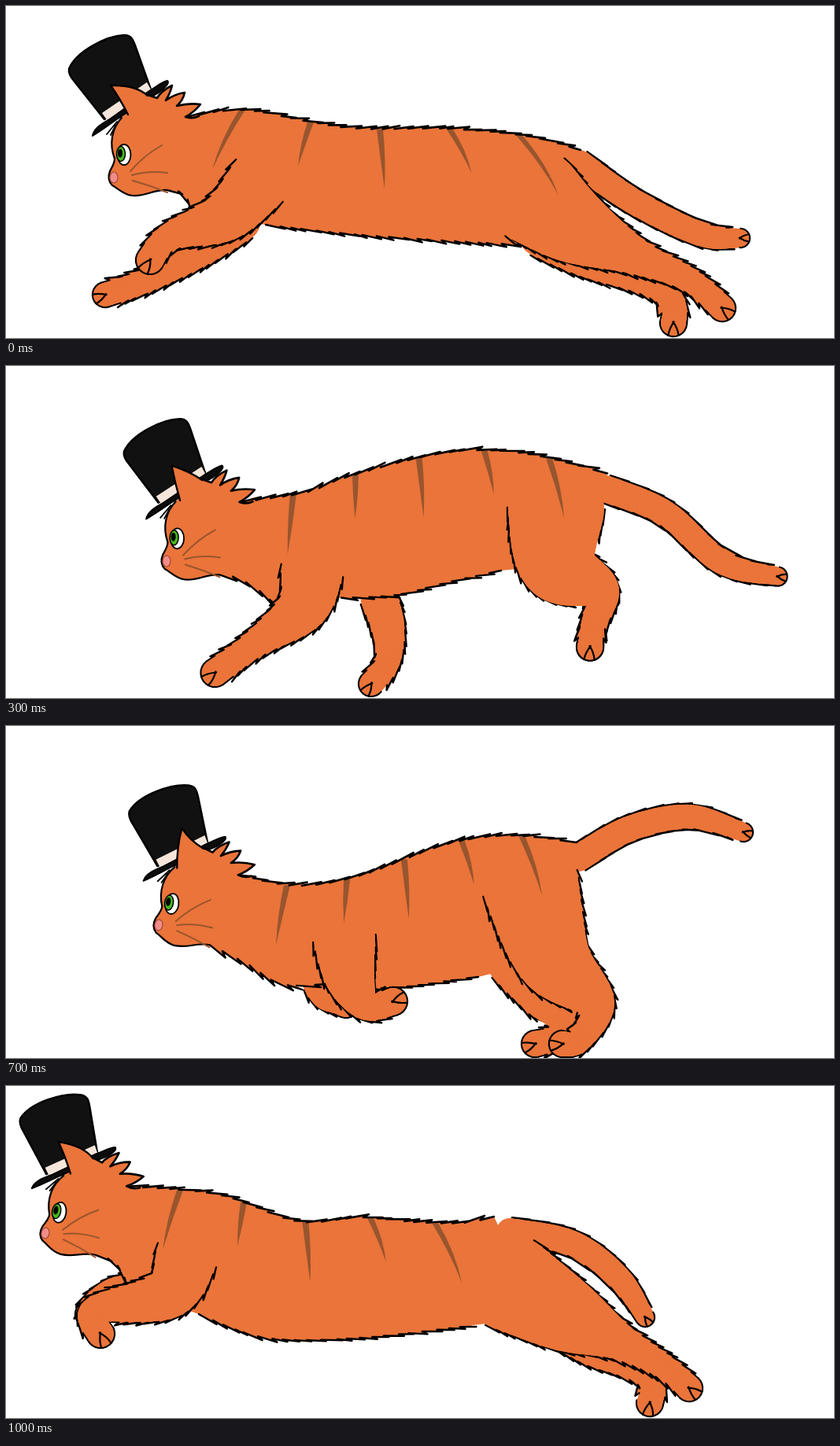
Recreate the animation shown at these times as an HTML page with a canvas. Size 1052 by 422 pixels, loop 1.1 s.

```html
<!DOCTYPE html>
<html lang="en">
<head>
<meta charset="utf-8">
<title>Running cat</title>
<style>
html, body { margin: 0; width: 100%; height: 100%; overflow: hidden; background: #fff; }
canvas { display: block; width: 100%; height: 100%; }
</style>
</head>
<body>
<canvas id="stage" width="1052" height="422"></canvas>
<script>
const ctx = document.getElementById('stage').getContext('2d');
const ORANGE = '#ea7439', BROWN = '#98552e', INK = '#000';

// Half widths of each limb from root to tip, one per joint
const WIDTH = {
  tail: [18, 17, 16, 12],
  fore: [40, 32, 18, 18], foreFar: [24, 22, 16, 16],
  hind: [62, 48, 24, 16, 17], hindFar: [30, 26, 20, 16, 17]
};

// A pose is a rig: head (nose x, y, turn, ear raised), stripe fan,
// body lines and the joints of the limbs. Hidden far legs follow the near ones.
const poses = [
  {
    head: [137, 218, 0, 0], fan: 22,
    back: [300,132, 385,147, 450,156, 560,156, 660,165, 730,183],
    belly: [330,278, 430,289, 540,297, 662,304],
    chest: [220,236, 232,248, 236,264],
    tail: [728,200, 800,250, 885,291, 933,295],
    fore: [322,222, 278,268, 208,293, 183,323], foreFar: [300,275, 250,308, 180,348, 126,367],
    hind: [672,243, 722,280, 800,318, 868,348, 910,384], hindFar: [680,290, 740,320, 820,350, 848,378, 848,403]
  },
  {
    head: [199, 249, -4, 0], fan: 9,
    back: [385,152, 405,141, 490,135, 580,120, 650,112, 778,127],
    belly: [382,290, 470,290, 560,276, 660,260],
    chest: [285,260, 295,273, 297,298],
    tail: [778,148, 838,188, 915,254, 977,265],
    fore: [358,258, 325,305, 235,346, 181,377], foreFar: [435,290, 440,330, 425,375, 390,405],
    hind: [712,180, 735,255, 820,268, 843,315, 866,349]
  },
  {
    head: [209, 247, 6.4, 1], fan: 4,
    back: [375,170, 450,145, 550,100, 605,94, 690,114, 750,146],
    belly: [470,299, 520,292, 560,274, 598,260],
    chest: [300,278, 342,293, 395,316],
    tail: [745,164, 838,186, 905,246, 984,270],
    fore: [420,262, 428,310, 395,362, 350,403], foreFar: [512,300, 530,330, 546,375, 538,403],
    hind: [686,182, 666,250, 692,302, 648,345, 618,366]
  },
  {
    head: [299, 255, 7.7, 1], fan: -4,
    back: [464,205, 530,152, 590,121, 645,109, 700,117, 765,151],
    belly: [535,322, 560,312, 585,308, 608,302],
    chest: [410,306, 460,331, 535,322],
    tail: [765,172, 860,154, 940,177, 995,216],
    fore: [522,240, 545,290, 558,335, 585,363], foreFar: [548,310, 548,330, 551,348, 557,360],
    hind: [715,190, 680,262, 668,335, 655,385, 574,404], hindFar: [640,260, 635,300, 636,345, 630,385, 575,400]
  },
  {
    head: [194, 253, 8, 1], fan: 10,
    back: [370,203, 450,190, 550,153, 610,141, 660,140, 725,148],
    belly: [462,334, 510,331, 560,324, 600,319],
    chest: [306,302, 350,328, 410,328],
    tail: [727,168, 793,130, 870,115, 937,135],
    fore: [430,270, 437,320, 458,357, 492,350], foreFar: [400,325, 408,340, 420,350, 432,355],
    hind: [666,200, 695,295, 750,352, 728,400, 707,404], hindFar: [640,300, 680,345, 708,372, 700,395, 672,404]
  },
  {
    head: [40, 213, 10, 1], fan: 14,
    back: [240,170, 350,184, 450,158, 490,158, 535,166, 565,158],
    belly: [190,288, 280,317, 390,320, 540,310],
    chest: [115,246, 130,256, 138,265],
    tail: [580,170, 650,134, 720,112, 782,101],
    fore: [207,228, 200,264, 152,282, 168,311],
    hind: [560,230, 632,298, 712,332, 734,372, 730,404], hindFar: [600,300, 640,325, 685,348, 690,378, 678,403]
  },
  {
    head: [50, 187, 10.2, 0], fan: 14,
    back: [270,138, 370,172, 450,167, 520,173, 580,174, 620,166],
    belly: [245,290, 330,320, 450,320, 610,302],
    chest: [135,222, 148,238, 155,258],
    tail: [640,185, 720,200, 780,245, 812,294],
    fore: [230,215, 205,265, 112,285, 120,315], foreFar: [175,262, 140,264, 112,277, 104,290],
    hind: [640,250, 710,290, 780,325, 838,358, 868,384], hindFar: [700,300, 745,330, 800,355, 822,378, 818,403]
  }
].map(p => ({ foreFar: p.fore, hindFar: p.hind, ...p }));

// Pose shown in each 100 ms step; halves are in-betweens
const steps = [0, .5, 1, 1.5, 2, 2.5, 3, 4, 4.5, 5, 6];

const rnd = i => { const v = Math.sin(i * 12.9898 + 4.1) * 43758.5453; return v - Math.floor(v); };
const lerp = (a, b, t) => a + (b - a) * t;
const mix = (a, b, t) => Array.isArray(a) ? a.map((v, i) => lerp(v, b[i], t)) : lerp(a, b, t);
const pairs = flat => Array.from({ length: flat.length / 2 }, (_, i) => flat.slice(2 * i, 2 * i + 2));

function poseAt(k) {
  const a = poses[Math.floor(k)], b = poses[Math.ceil(k)];
  return Object.fromEntries(Object.keys(a).map(n => [n, mix(a[n], b[n], k % 1)]));
}

// Catmull-Rom through points of any dimension
function spline(p) {
  const out = [], get = i => p[Math.max(0, Math.min(p.length - 1, i))];
  for (let i = 0; i < p.length - 1; i++)
    for (let t = 0; t < 1; t += 1 / 16) {
      const [a, b, c, d] = [-1, 0, 1, 2].map(o => get(i + o));
      out.push(b.map((v, j) => v + .5 * t * (c[j] - a[j] + t * (2 * a[j] - 5 * v + 4 * c[j] - d[j] + t * (3 * (v - c[j]) + d[j] - a[j])))));
    }
  return [...out, p[p.length - 1]];
}

// Position and normal at a distance along a polyline
function walker(pts) {
  const d = [0];
  for (let i = 1; i < pts.length; i++)
    d.push(d[i - 1] + Math.hypot(pts[i][0] - pts[i - 1][0], pts[i][1] - pts[i - 1][1]));
  const at = s => {
    let i = 1;
    while (i < d.length - 1 && d[i] < s) i++;
    const [x0, y0] = pts[i - 1], [x1, y1] = pts[i], l = d[i] - d[i - 1] || 1;
    const t = (s - d[i - 1]) / l;
    return [lerp(x0, x1, t), lerp(y0, y1, t), (y1 - y0) / l, (x0 - x1) / l];
  };
  return { len: d[d.length - 1], at };
}

// Saw-toothed tufts along a curve; a third value lifts the pen
function fur(pts, side, h, size) {
  const w = walker(pts), n = Math.max(2, Math.round(w.len / size)), s = w.len / n;
  const out = [pts[0].slice(0, 2)];
  for (let i = 1; i <= n; i++) {
    const r = rnd(i + n * 7), base = i < n ? (i + (r - .5) * .5) * s : w.len;
    if (i < n) {
      const [x, y, nx, ny] = w.at(base + s * .4), o = side * h * (.4 + .8 * rnd(i * 3 + n));
      out.push([x + nx * o, y + ny * o]);
    }
    out.push([...w.at(base).slice(0, 2), r < .2]);
  }
  return out;
}

function trace(pts, pen) {
  ctx.beginPath();
  pts.forEach((p, i) => i && !(pen && p[2]) ? ctx.lineTo(p[0], p[1]) : ctx.moveTo(p[0], p[1]));
}
function fill(pts, color = ORANGE) { trace(pts); ctx.fillStyle = color; ctx.fill(); }
function ink(pts, width = 2.4) {
  trace(pts, true);
  ctx.strokeStyle = INK; ctx.lineWidth = width; ctx.stroke();
}

// Limb around a spine: furry edges, rounded tip, two toe lines
function limb(joints, widths, h = 3.5, size = 13) {
  const spine = spline(pairs(joints).map((p, i) => [...p, widths[i]]));
  const last = spine.length - 1;
  const edge = s => spine.map(([x, y, w], i) => {
    const [x0, y0] = spine[Math.max(0, i - 1)], [x1, y1] = spine[Math.min(last, i + 1)];
    const l = Math.hypot(x1 - x0, y1 - y0) || 1;
    return [x + s * w * (y1 - y0) / l, y - s * w * (x1 - x0) / l];
  });
  const front = edge(-1), rear = edge(1);
  const fa = fur(front, -1, h, size), fb = fur(rear, 1, h, size);
  const [x, y, r] = spine[last];
  const dir = Math.atan2(rear[last][1] - y, rear[last][0] - x) + Math.PI / 2;
  const polar = (a, d) => [x + d * Math.cos(dir + a), y + d * Math.sin(dir + a)];
  const tip = Array.from({ length: 13 }, (_, i) => polar(Math.PI * (.5 - i / 12), r));

  return {
    front, rear,
    draw() {
      fill([...fa, ...tip.slice().reverse(), ...fb.slice().reverse()]);
      ink(fa); ink(fb); ink(tip);
      ctx.fillStyle = ORANGE;
      for (const [cx, cy, w] of spine) {
        ctx.beginPath(); ctx.arc(cx, cy, w - 1, 0, 7); ctx.fill();
      }
      for (const a of [-.45, .35]) {
        ctx.beginPath();
        ctx.moveTo(...polar(a, r));
        ctx.quadraticCurveTo(...polar(a * 1.7, r * .5), ...polar(a, -r * .1));
        ctx.lineWidth = 2.2; ctx.stroke();
      }
    }
  };
}

// Five tapered stripes hang from the back and fan out
function stripes(back, fan) {
  const w = walker(back);
  ctx.fillStyle = BROWN;
  for (let i = 0; i < 5; i++) {
    const [x, y] = w.at(w.len * (.14 + .175 * i));
    const tx = x + 6 + fan * (i - 2), ty = y + 76 - 20 * (i % 2);
    const cx = lerp(x, tx, .65), cy = (y + ty) / 2;
    ctx.beginPath();
    ctx.moveTo(x - 4, y);
    ctx.quadraticCurveTo(cx - 3, cy, tx, ty);
    ctx.quadraticCurveTo(cx + 4, cy, x + 4, y);
    ctx.fill();
  }
}

function ellipse(x, y, rx, ry, color, width, line = INK) {
  ctx.beginPath();
  ctx.ellipse(x, y, rx, ry, 0, 0, 7);
  ctx.fillStyle = color; ctx.fill();
  if (width) { ctx.strokeStyle = line; ctx.lineWidth = width; ctx.stroke(); }
}

// Head shapes, measured from the nose
const crown = new Path2D('M-57-138C-48-160-10-180 13-181C22-181 24-176 27-168L47-112L-12-74L-50-122Q-58-131-57-138Z');
const brim = new Path2D('M-27-53C-25-64-12-70-4-75L45-110C55-116 62-122 68-123C72-120 62-110 50-104L10-78C0-72-12-62-27-53Z');
const faceLine = 'M10-76C-3-62-6-42 1-24C1-18-3-12-5-8C-8 0-6 6-2 10C6 14 12 22 24 23C42 24 50 15 68 16';
const maneLine = '108-78Q100-74 91-77Q102-83 110-93Q95-95 80-91Q88-98 90-108Q77-106 66-98Q72-108 74-117Q60-110 55-101L43-105';
const face = new Path2D(faceLine);
const skull = new Path2D(faceLine + 'L100 0L120-55L' + maneLine + 'Z');
const mane = new Path2D('M' + maneLine);
const whiskers = new Path2D('M21-8Q38-28 61-41M23-3Q44-9 68-6M24 4Q46 10 68 19');
const tuft = new Path2D('M4-71L-9-55M2-66L-4-54');

const onHead = ([x, y, turn], px, py) => {
  const a = turn * Math.PI / 180, c = Math.cos(a), s = Math.sin(a);
  return [x + px * c - py * s, y + px * s + py * c];
};

function stroke(path, width, color = INK) {
  ctx.strokeStyle = color; ctx.lineWidth = width; ctx.stroke(path);
}

function drawHead([x, y, turn, up]) {
  ctx.save();
  ctx.translate(x, y);
  ctx.rotate(turn * Math.PI / 180);

  ctx.fillStyle = '#111';
  ctx.fill(crown); stroke(crown, 2.5);
  fill([[-15, -82], [42, -121], [47, -112], [-8, -72]], '#f5e6dc');
  ctx.fillStyle = '#0c0c0c';
  ctx.fill(brim); stroke(brim, 2);

  ctx.fillStyle = ORANGE;
  ctx.fill(skull);
  stroke(face, 2.2); stroke(mane, 2.6); stroke(tuft, 1.8);

  ctx.beginPath();
  ctx.moveTo(lerp(18, 13, up), lerp(-80, -75, up));
  ctx.quadraticCurveTo(lerp(8, 9, up), -100, lerp(-4, 12, up), lerp(-117, -126, up));
  ctx.quadraticCurveTo(lerp(28, 24, up), lerp(-118, -112, up), 43, -104);
  ctx.fillStyle = ORANGE; ctx.fill();
  ctx.strokeStyle = INK; ctx.lineWidth = 2.4; ctx.stroke();

  stroke(whiskers, 2, BROWN);
  ellipse(13, -29, 8.5, 13, '#fff', 1.8);
  ellipse(9, -30, 5.5, 9.5, '#45b81c', 1.5);
  ellipse(8, -31, 3, 5.5, INK);
  ellipse(0, 0, 5, 7, '#f28c88', 1.2, '#a04a3c');
  ctx.restore();
}

function draw(k) {
  const p = poseAt(k);
  ctx.fillStyle = '#fff';
  ctx.fillRect(0, 0, 1052, 422);
  ctx.lineCap = ctx.lineJoin = 'round';

  const spineLine = spline([onHead(p.head, 93, -77), ...pairs(p.back)]);
  const back = fur(spineLine, 1, 3.5, 17);
  const belly = fur(spline(pairs(p.belly)), -1, 3.5, 16);
  const chest = fur(spline([onHead(p.head, 68, 16), ...pairs(p.chest)]), -1, 1 + 6 * p.head[3], 18);
  const part = n => limb(p[n], WIDTH[n]);
  const tail = limb(p.tail, WIDTH.tail, 1.2, 20), hind = part('hind');

  part('hindFar').draw();
  part('foreFar').draw();
  tail.draw();
  fill([...back, tail.front[0], hind.rear[0], pairs(p.hind)[1], ...belly.slice().reverse(), ...chest.slice().reverse()]);
  ink(belly); ink(chest);
  hind.draw();
  part('fore').draw();
  stripes(spineLine, p.fan);
  ink(back, 2.6);
  drawHead(p.head);
}

let shown = -1;
function tick() {
  const i = Math.floor(performance.now() % 1100 / 100);
  if (i !== shown) draw(steps[shown = i]);
  requestAnimationFrame(tick);
}
tick();
</script>
</body>
</html>
```
